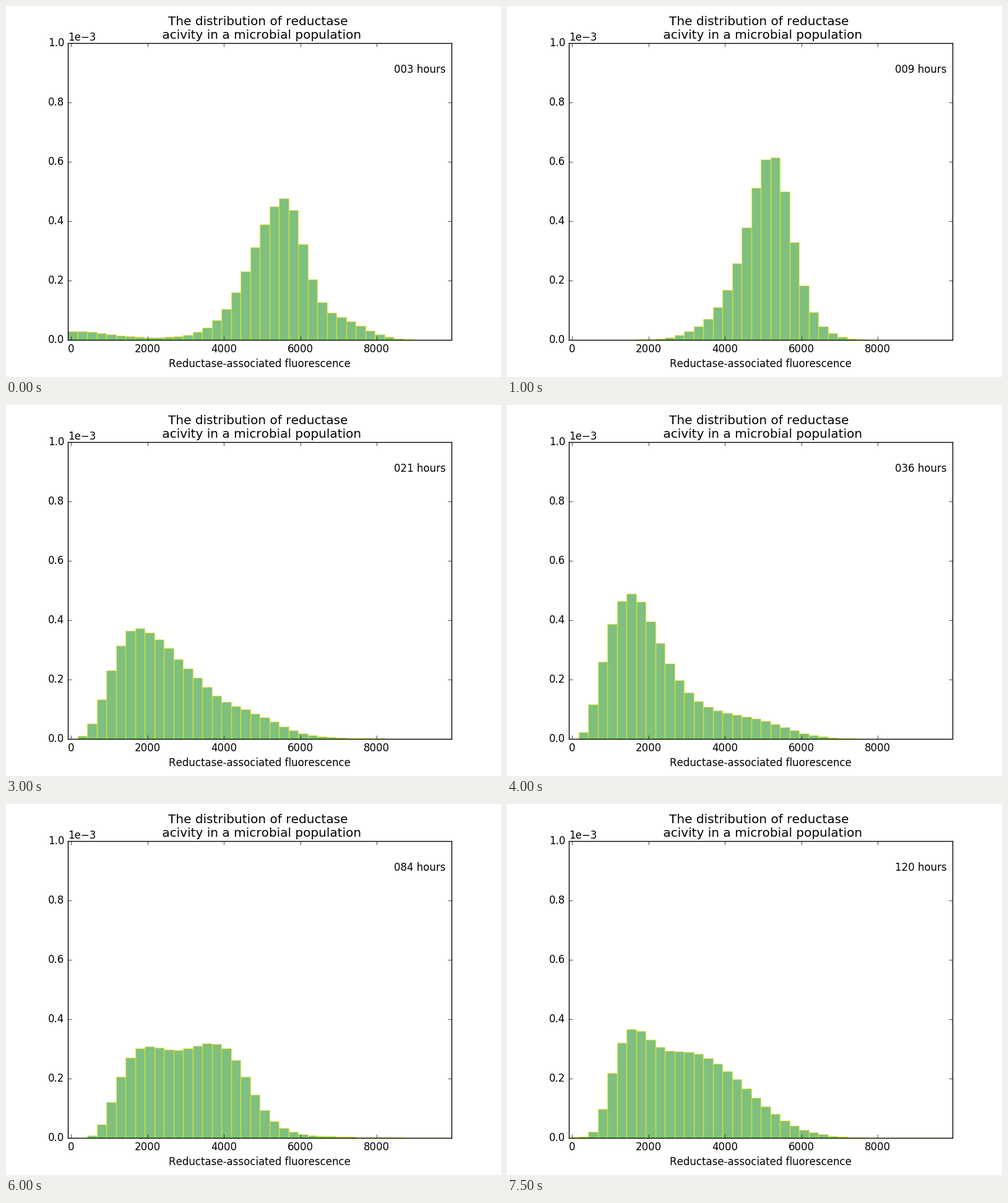
A matplotlib script for the animation above (8 s loop, 800x600 px).

```python
import numpy as np
import matplotlib.pyplot as plt
from matplotlib.animation import FuncAnimation
from matplotlib.patches import PathPatch
from matplotlib.path import Path

plt.style.use("classic")
plt.rcParams.update({"font.family": "DejaVu Sans", "text.kerning_factor": 6,
                     "figure.dpi": 100, "savefig.dpi": 100,
                     "figure.facecolor": "white"})

BINS, STEPS = 40, 16
UNIT = 1e-3 / 477  # density per unit of bar height
X0, X1 = -86, 9958
NUDGE = 1  # keeps bar edges off exact half pixels
EDGES = np.linspace(X0, X1, BINS + 1) + NUDGE
BIN = np.arange(BINS)


def bell(amp, mode, left, right):
    """Gaussian with its own spread on each side."""
    d = BIN - mode
    return amp * np.exp(-0.5 * (d / np.where(d < 0, left, right)) ** 2)


def log_bell(amp, mode, left, right):
    """The same bump on a logarithmic axis: steep rise, long tail."""
    d = np.log((BIN + 1) / (mode + 1))
    return amp * np.exp(-0.5 * (d / np.where(d < 0, left, right)) ** 2)


# step -> bar heights, as a sum of cell populations
KEYS = {
    0: bell(197, 22.1, 3.3, 1.9) + bell(37, 27, 8, 3) + bell(14, 0, 1, 4),
    2: bell(200, 20.7, 2.18, 1.83) + bell(100, 20, 4, 3.3),
    4: log_bell(134, 7.4, 0.43, 0.43) + bell(58, 16.8, 4.8, 3.1),
    8: log_bell(229, 6, 0.5, 0.37) + bell(30, 18, 6, 3.8),
    10: log_bell(144, 7.6, 0.37, 0.43) + bell(56, 16.9, 4.8, 3.1),
    12: log_bell(140, 7.3, 0.38, 0.43) + bell(110, 15.7, 3.5, 2.7),
    15: log_bell(148, 5.9, 0.34, 0.305) + bell(125, 13, 4, 5.2),
}


def morph(a, b, t):
    """Slide the mass of one histogram towards another."""
    pos = np.arange(BINS + 1)
    ca, cb = (np.append(0, np.cumsum(h + 1e-6)) for h in (a, b))
    ma, mb = ca[-1], cb[-1]
    u = np.union1d(ca / ma, cb / mb)
    x = (1 - t) * np.interp(u, ca / ma, pos) + t * np.interp(u, cb / mb, pos)
    return np.diff(np.interp(pos, x, u)) * ((1 - t) * ma + t * mb)


def heights(step):
    if step in KEYS:
        return KEYS[step]
    lo = max(k for k in KEYS if k < step)
    hi = min(k for k in KEYS if k > step)
    return morph(KEYS[lo], KEYS[hi], (step - lo) / (hi - lo))


def bar_path(tops):
    left, right, zero = EDGES[:-1], EDGES[1:], np.zeros(BINS)
    xs = np.stack([left, left, right, right, left], axis=1)
    ys = np.stack([zero, tops, tops, zero, zero], axis=1)
    codes = [Path.MOVETO] + [Path.LINETO] * 3 + [Path.CLOSEPOLY]
    return Path(np.column_stack([xs.ravel(), ys.ravel()]), codes * BINS)


def hours(step):
    return 3 * (step + 1) if step < 8 else 12 * (step - 5)


fig = plt.figure(figsize=(8, 6), facecolor="white")
ax = fig.add_axes([0.125, 0.1, 0.775, 0.8])
ax.set_xlim(X0, X1)
ax.set_ylim(0, 1e-3)
ax.set_xticks(range(0, 10000, 2000))
ax.set_yticks(np.linspace(0, 1e-3, 6))
ax.ticklabel_format(axis="y", style="sci", scilimits=(-3, -3))
ax.set_xlabel("Reductase-associated fluorescence")
for x, y, line in ((262.3, 31, "The distribution of reductase"),
                   (246.4, 53, " acivity in a microbial population")):
    fig.text(x / 800, 1 - y / 600, line, size=14.4, ha="left", va="baseline")

bars = ax.add_patch(PathPatch(bar_path(heights(0) * UNIT), facecolor="green",
                              edgecolor="yellow", alpha=0.5))
clock = ax.text(0.85, 0.9, "", transform=ax.transAxes)


def update(step):
    bars.set_path(bar_path(heights(step) * UNIT))
    clock.set_text(f"{hours(step):03d} hours")
    return bars, clock


anim = FuncAnimation(fig, update, frames=STEPS, interval=500, repeat=True,
                     repeat_delay=0, blit=False)
plt.show()
```
